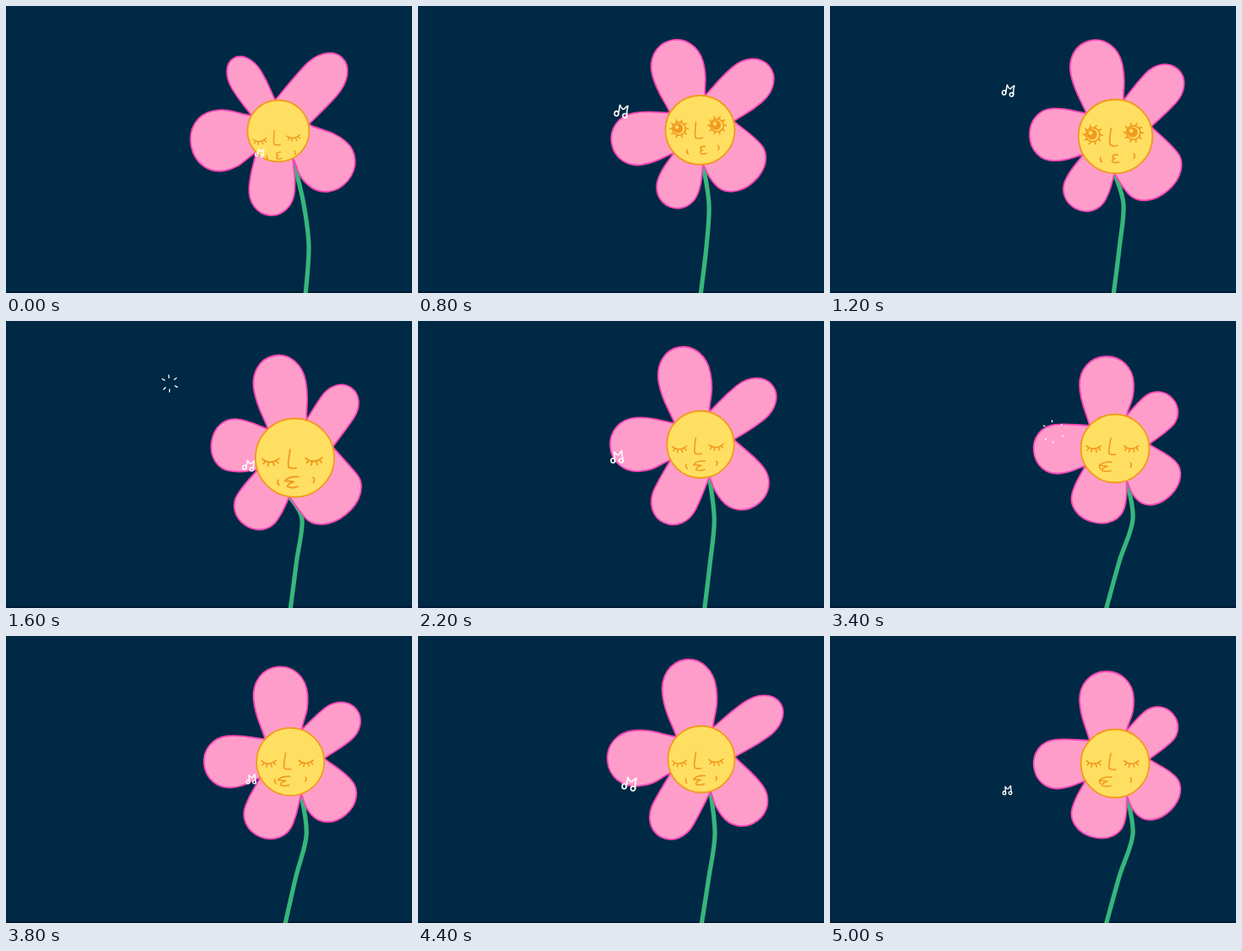
An HTML page for the animation above (5.2 s loop, 480 by 340 pixels).

```html
<!DOCTYPE html>
<html lang="en">
<head>
<meta charset="utf-8">
<title>Whistling flower</title>
<style>
html, body { margin: 0; width: 100%; height: 100%; overflow: hidden; background: #002945; }
svg { display: block; width: 100vw; height: 100vh; }
</style>
</head>
<body>
<svg viewBox="0 0 480 340" fill="none" stroke-linecap="round" stroke-linejoin="round">
  <rect width="480" height="340" fill="#002945"/>
  <rect y="338" width="480" height="2" fill="#001d35"/>
  <g id="scene"></g>
</svg>
<script>
const STEP = 200, STEPS = 26;
const ORANGE = '#f19a20', YELLOW = '#ffdf61';
const scene = document.getElementById('scene');

// Petals run clockwise from the upper left: tip x, tip y, half width,
// and the angle of the joint with the next petal.
// head: x, y, radius. stem: x at three heights. face: nose x, y, tilt, mouth shift.
const poses = {
  rest: {
    head: [322, 148, 36.5], stem: [352, 358, 354], face: [317, 163, -6, 4],
    petals: [[269, 62, 20, -96], [397, 61, 26, -12], [404, 207, 34, 62], [312, 248, 27, 136], [219, 166, 36, 210]]
  },
  look: {
    head: [333.5, 147, 41], stem: [344, 341, 334], face: [328, 155, -5, 7],
    petals: [[298, 41, 31, -82], [415, 71, 27, -15], [397, 208, 36, 85], [298, 238, 25, 139], [229, 163, 31, 210]]
  },
  lean: {
    head: [341.5, 162, 46.5], stem: [350, 343.5, 336], face: [334, 172, -1, 2],
    petals: [[317, 41, 31, -73], [408, 79, 23, -16], [402, 229, 40, 98], [283, 242, 28, 162], [243, 143, 31, 227]]
  },
  peek: {
    head: [331, 147, 40.5], stem: [348, 350, 349], face: [328, 157, -6, 3],
    petals: [[286, 40, 28, -90], [391, 67, 28, -21], [408, 207, 36, 77], [301, 241, 28, 143], [237, 152, 28, 212]]
  },
  blow: {
    head: [337, 151, 40.5], stem: [358, 342, 326], face: [330, 156, 0, -5],
    petals: [[326, 42, 32, -71], [405, 92, 24, -7], [403, 206, 32, 70], [310, 238, 32, 150], [241, 155, 29, 222]]
  },
  stretch: {
    head: [335, 146, 39.5], stem: [351, 344, 335], face: [327, 155, -2, 4],
    petals: [[316, 28, 32, -70], [428, 79, 25, -4], [401, 219, 30, 74], [287, 238, 27, 156], [224, 148, 33, 222]]
  }
};
const keys = [[0, 'rest'], [4, 'look'], [8, 'lean'], [10, 'stretch'], [14, 'peek'],
  [16, 'stretch'], [17, 'blow'], [22, 'stretch'], [24, 'blow'], [26, 'blow']];

// Each note: first step, step it bursts, path [step, x, y, size], burst centre
const notes = [
  { from: 0, pop: 7, path: [[0, 300, 174, .65], [4, 240.5, 124.5, 1], [6, 211, 100, .9]], at: [193.5, 74] },
  { from: 8, pop: 12, path: [[8, 287, 171, .85], [12, 218, 158, 1]], at: [208, 157] },
  { from: 13, pop: 15, path: [[13, 290, 160, .65], [14, 280, 145, .75]], at: [264, 131] },
  { from: 18, pop: 26, path: [[18, 303, 168, .65], [22, 250, 175, 1.05], [24, 195, 185, .9], [25, 209.5, 183, .7]], at: [0, 0] }
];

const mix = (a, b, t) => Array.isArray(a) ? a.map((v, i) => mix(v, b[i], t)) : a + (b - a) * t;
const add = (p, q, k = 1) => [p[0] + q[0] * k, p[1] + q[1] * k];
const polar = (deg, r) => [Math.cos(deg * Math.PI / 180) * r, Math.sin(deg * Math.PI / 180) * r];
const pt = p => p[0].toFixed(1) + ' ' + p[1].toFixed(1);
const curve = (a, b, c) => `C${pt(a)} ${pt(b)} ${pt(c)}`;
const line = (d, extra = '') => `<path d="${d}" ${extra}/>`;

function span(list, n) {
  let i = 0;
  while (i < list.length - 2 && n >= list[i + 1][0]) i++;
  const [a, b] = [list[i], list[i + 1]];
  return [a, b, Math.min(1, (n - a[0]) / (b[0] - a[0]))];
}

function poseAt(n) {
  const [a, b, t] = span(keys, n), p = poses[a[1]], q = poses[b[1]], out = {};
  for (const k in p) out[k] = mix(p[k], q[k], t);
  return out;
}

function petal(a, b, tip, w) {
  const m = mix(a, b, .5), u = add(tip, m, -1), len = Math.hypot(...u);
  const n = [-u[1] / len * w, u[0] / len * w];
  const waist = add(m, u, .56);
  const s1 = add(waist, n, -1), s2 = add(waist, n);
  return line('M' + pt(a)
    + curve(mix(a, s1, .36), add(s1, u, -.27), s1)
    + curve(add(s1, u, .25), add(tip, n, -.58), tip)
    + curve(add(tip, n, .58), add(s2, u, .25), s2)
    + curve(add(s2, u, -.27), mix(b, s2, .36), b) + 'Z');
}

function stem(top, xs) {
  const p = [top, [xs[0], 235], [xs[1], 285], [xs[2], 343]];
  let d = 'M' + pt(top);
  for (let i = 0; i < 3; i++) {
    const prev = p[i - 1] || p[i], next = p[i + 2] || p[i + 1];
    d += curve(add(p[i], add(p[i + 1], prev, -1), 1 / 6), add(p[i + 1], add(next, p[i], -1), -1 / 6), p[i + 1]);
  }
  return line(d, 'stroke="#37b67b" stroke-width="5.2"');
}

function eye(x, y, open) {
  let s = `<g transform="translate(${x} ${y})">`;
  if (open) {
    for (let a = 0; a < 360; a += 36) s += line(`M${pt(polar(a, 7.5))}L${pt(polar(a + 6, 10.5))}`);
    s += `<circle r="7.5"/><circle cx="-1" cy="-.5" r="4.8" fill="${ORANGE}"/>`
      + `<circle cx="-2.3" cy="-2" r="2.2" fill="${YELLOW}" stroke="none"/>`;
  } else {
    s += line('M-8.5-2Q-1 5 8.5-2');
    for (const a of [30, 68, 108, 146]) {
      const [cx, cy] = polar(a, 1);
      s += line(`M${pt([cx * 6.5, cy * 2 - .5])}L${pt([cx * 9, cy * 5.5])}`);
    }
  }
  return s + '</g>';
}

function face([x, y, tilt, mouth], k, open, small) {
  const lips = small
    ? 'M3-4C-3-5-4-1 0 0C-5 1-4 6 4 4'
    : 'M8-5Q-2-6-6-1Q-1-1 3 0Q-4 2-3 5Q2 7 7 5';
  const eyeY = open ? -11 : -6;
  return `<g transform="translate(${x} ${y}) rotate(${tilt}) scale(${k})" stroke="${ORANGE}" stroke-width="1.6">`
    + line('M2-17C1-10-1-4 0 1Q3 3 8 2') + eye(-18, eyeY, open) + eye(26, eyeY, open)
    + `<g transform="translate(${mouth} 16)">${line(lips)}</g>`
    + line('M-11 14q-1 3 1 5M25 12q2 2 0 5') + '</g>';
}

function note(x, y, k, n) {
  return `<g transform="translate(${x} ${y}) rotate(${n % 2 ? -8 : 6}) scale(${k})" stroke="#fff" stroke-width="${1.6 / Math.sqrt(k)}">`
    + '<ellipse cx="-5.5" cy="3.5" rx="2.4" ry="2.8"/><ellipse cx="4.5" cy="5" rx="2.4" ry="2.5"/>'
    + line('M-3.2 4.5L-2.5-7Q1-1 3-3Q5-6 7-7Q6-1 7 5') + '</g>';
}

function burst([x, y], k) {
  const r = 4.5 + 4 * k, len = k < 2 ? 3.2 : 1.6;
  let d = '';
  for (let i = 0; i < 6; i++) {
    const a = i * 60 + 25 + 9 * Math.sin(i * 2.4), q = r + Math.sin(i * 3.1);
    d += `M${pt(add([x, y], polar(a, q - len / 2)))}L${pt(add([x, y], polar(a, q + len / 2)))}`;
  }
  return line(d, 'stroke="#fff" stroke-width="1.3"');
}

function draw(n) {
  const { head, petals, stem: xs, face: f } = poseAt(n);
  const [cx, cy, r] = head;
  const joints = petals.map(p => add([cx, cy], polar(p[3], r)));
  const open = (n > 2 && n < 7) || (n > 12 && n < 16);
  let s = stem(joints[2], xs) + '<g fill="#ff9dca" stroke="#fb46b4" stroke-width="1.8">';
  petals.forEach((p, i) => s += petal(joints[(i + 4) % 5], joints[i], p, p[2]));
  s += `</g><circle cx="${cx}" cy="${cy}" r="${r}" fill="${YELLOW}" stroke="${ORANGE}" stroke-width="1.8"/>`;
  s += face(f, r / 40, open, open || n < 3);
  for (const m of notes) {
    if (n >= m.from && n < m.pop) {
      const [a, b, t] = span(m.path, n), [, x, y, k] = mix(a, b, t);
      s += note(x, y, k, n);
    } else if (n >= m.pop && n < m.pop + 3) {
      s += burst(m.at, n - m.pop);
    }
  }
  scene.innerHTML = s;
}

const start = performance.now();
let shown = -1;
function tick() {
  const n = Math.floor((performance.now() - start) / STEP) % STEPS;
  if (n !== shown) draw(shown = n);
  requestAnimationFrame(tick);
}
tick();
</script>
</body>
</html>
```
